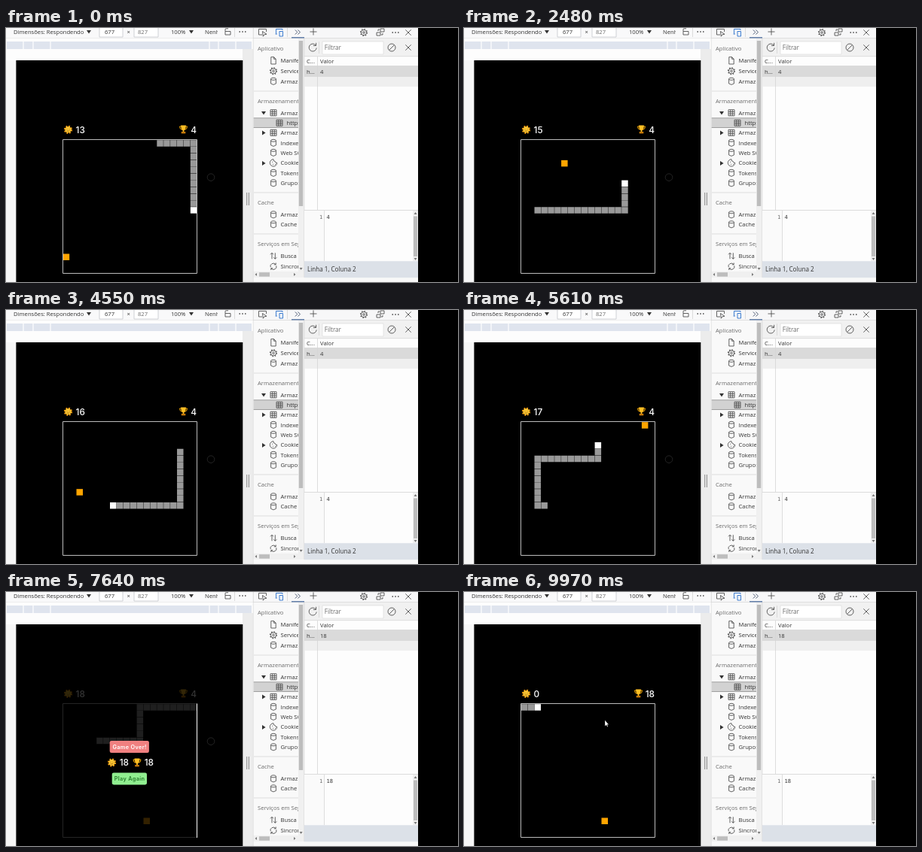
Write an HTML page that moves like this. It is 600x338 px and loops after 10000 ms.

```html
<!DOCTYPE html>
<html lang="pt">
<head>
<meta charset="utf-8">
<title>Snake</title>
<style>
html, body { margin: 0; width: 100%; height: 100%; overflow: hidden; background: #000; }
svg { display: block; width: 100vw; height: 100vh; }
text { font: 7.65px "Open Sans", "Noto Sans", sans-serif; fill: #333; }
.muted { fill: #6b6b6b; }
.wide { font-size: 8.1px; }
.mono { font: 7px "DejaVu Sans Mono", monospace; }
.score text { font: 500 11.8px Inter, sans-serif; fill: #fff; }
.score .button { font: 600 7.3px Inter, sans-serif; letter-spacing: .35px; text-anchor: middle; }
.score .again { fill: #267a2b; }
.line { fill: none; stroke: #484848; stroke-width: .85; }
.rule { fill: none; stroke: #d5d5d5; stroke-width: .8; }
</style>
</head>
<body>
<svg viewBox="0 0 600 338">
  <defs>
    <g id="sun">
      <circle r="4.6" fill="none" stroke="#f8a010" stroke-width="2" stroke-dasharray="2 1.61"/>
      <circle r="4" fill="#ffc936"/>
      <path d="M-1.5-1.2v1M1.5-1.2v1M-1.8 1.3q1.8 1.6 3.6 0" fill="none" stroke="#734400" stroke-width=".7"/>
    </g>
    <g id="trophy">
      <path d="M-3-4H-5q0 4 3.4 4.4M3-4H5q0 4-3.4 4.4" fill="none" stroke="#f5a800" stroke-width="1"/>
      <path d="M-3.4-5.4H3.4Q3.4 0 .9 1.2V3H-.9V1.2Q-3.4 0-3.4-5.4Z" fill="#ffbf24"/>
      <path d="M-2.8 3H2.8V5.4H-2.8Z" fill="#c87a08"/>
    </g>
    <g id="cylinder" class="line"><ellipse cy="-3" rx="3.4" ry="1.5"/><path d="M-3.4-3V3.2Q0 6 3.4 3.2V-3"/></g>
    <path id="grid" class="line" d="M-4-4H4V4H-4ZM-4-1.3H4M-4 1.3H4M-1.3-4V4M1.3-4V4"/>
    <g id="gear" class="line"><circle r="4.4" stroke-width="1.3" stroke-dasharray="1.4 2.056"/><circle r="3.6"/><circle r="1.3"/></g>
    <path id="document" class="line" d="M-3.2-4.7H.6L3.2-2V4.7H-3.2ZM.6-4.7V-2H3.2"/>
    <g id="cookie" class="line"><path d="M0-4.6A4.7 4.7 0 1 0 4.7 0Q2.5.5 2.2-1.8Q-.3-1.7 0-4.6"/><path d="M-2-1h1M-1 2h1M2 2h1"/></g>
    <path id="transfer" class="line" d="M-2 4V-4M-4-2L-2-4L0-2M2.3-4V4M.3 2L2.3 4L4.3 2"/>
    <path id="sync" class="line" d="M-3.8 1A3.9 3.9 0 0 1 3-2.6M3.8-1A3.9 3.9 0 0 1-3 2.6M3.2-4.8V-2.4H.8M-3.2 4.8V2.4H-.8"/>
    <path id="close" class="line" d="M-3.7-3.7L3.7 3.7M3.7-3.7L-3.7 3.7"/>
    <path id="down" d="M-3-2H3L0 2.6Z" fill="#333"/>
    <path id="right" d="M-2-3V3L2.6 0Z" fill="#333"/>
    <path id="dots" d="M-4.5 0h1.5M-.75 0H.75M3 0H4.5" stroke="#444" stroke-width="1.5"/>
    <clipPath id="sideClip"><path d="M328 13H388V324H328Z"/></clipPath>
    <clipPath id="throttleClip"><path d="M260 0H281V14H260Z"/></clipPath>
    <clipPath id="boardClip"><path d="M75 148H254V328H75Z"/></clipPath>
  </defs>

  <!-- device toolbar -->
  <path d="M0 0H547V338H0Z" fill="#fdfdfd"/>
  <path d="M0 0H328V13H0Z" fill="#f9f9fa"/>
  <path d="M0 13.5H328" class="rule" stroke-opacity=".5"/>
  <text x="10" y="8">Dimensões: Respondendo</text><use href="#down" x="110" y="5"/>
  <path d="M124-2H155V12H124ZM170-2H202V12H170Z" fill="#fff" stroke="#c4c7cc" stroke-width=".8"/>
  <text x="131" y="8">677</text><text x="160.5" y="8">×</text><text x="175" y="8" class="muted">827</text>
  <text x="219" y="8">100%</text><use href="#down" x="246" y="5"/>
  <g clip-path="url(#throttleClip)"><text x="264" y="8">Nenhuma</text></g>
  <path class="line" d="M291 4.5H298V9H291ZM291 4.5V2Q291 .8 292.2.8H295"/>
  <path class="rule" d="M303.5 0V12"/><use href="#dots" x="314" y="5"/>
  <path d="M1 18H326V28H1Z" fill="#dfe4ee"/>
  <path d="M23 18V28M36 18V28M59 18V28M270 18V28M282 18V28M305 18V28" stroke="#fff" stroke-width="1.2"/>
  <path d="M314 28H328V338H314Z" fill="#ececec"/><path d="M0 43H13.5V338H0Z" fill="#f7f7f7"/>
  <path d="M13.4 42.9H314.3V338H13.4Z"/>
  <path d="M319.7 219V236M322.4 219V236" stroke="#888" stroke-width="1"/>

  <!-- inspector toolbar -->
  <path d="M328 0H547V13.5H328Z" fill="#f7f7f8"/>
  <path class="rule" d="M328.3 0V338M328 13.6H547M373.5 0V12"/>
  <path class="line" d="M340 9H335.5V1.5H345.5V5M340.5 4.5L346 8.3L343 8.7L341.3 11.2Z"/>
  <path class="line" style="stroke:#1a66c9" d="M360 8H357.5M358.5 7.5V1.5H367V3M363 4.5H367.5V11H363Z"/>
  <path class="line" style="stroke:#33435f" d="M383.8 2.5L386.8 5.5L383.8 8.5M387.5 2.5L390.5 5.5L387.5 8.5"/>
  <path d="M379 12.8H396" stroke="#41659a" stroke-width="1.2"/>
  <path class="line" d="M403.5 5H412.5M408 .5V9.5"/>
  <use href="#gear" x="475" y="6"/>
  <path class="line" d="M497 1H502V5H497ZM492 6H497V10H492ZM494 4V2H496M500 7V9H498"/>
  <use href="#dots" x="517" y="6"/><use href="#close" x="534" y="6"/>

  <!-- storage sidebar -->
  <path d="M328.7 14H388V324H328.7Z" fill="#f9f9f9"/>
  <path d="M328.7 120H388V132.5H328.7Z" fill="#d2d2d2"/>
  <path d="M328.7 119.8H388M328.7 132.5H388" stroke="#8c8c8c" stroke-width=".8"/>
  <path class="rule" d="M329 84H388M329 219H388M329 274H388"/>
  <g id="sidebar" clip-path="url(#sideClip)"></g>
  <use href="#down" x="342" y="113"/><use href="#right" x="342" y="139.5"/><use href="#right" x="342" y="180"/>
  <path d="M388 14H395.5V332H388ZM328.7 324H388V332H328.7Z" fill="#f0f0f0"/>
  <path d="M388.8 17H394.2V237H388.8ZM336 325.2H350V330.8H336Z" fill="#bdbdbd"/>
  <path d="M389.6 319H393.6L391.6 322ZM333 326V330L330.5 328ZM382 326V330L384.5 328Z" fill="#777"/>
  <path d="M328.7 332H547V338H328.7Z" fill="#f8f8f8"/>

  <!-- storage table -->
  <path d="M396 14H547V37.5H396Z" fill="#f1f1f1"/>
  <path class="rule" d="M395.8 14V332M415.5 18V34"/>
  <path class="line" d="M411.2 23A5 5 0 1 0 412.2 26.5M411.6 19.8V23.4H408"/>
  <path d="M420 18H501V35H420Z" fill="#fff" stroke="#dcdcdc" stroke-width=".7"/><text x="422.8" y="29" class="muted wide">Filtrar</text>
  <g class="line"><circle cx="512" cy="26" r="5"/><path d="M508.5 29.5L515.5 22.5"/></g><use href="#close" x="534" y="26"/>
  <path d="M396 51H547V65H396Z" fill="#dadada"/><path d="M396 65H547V78H396Z" fill="#efefef"/>
  <path class="rule" d="M396 37.7H547M396 50.5H547M413.5 38V242M396 242.5H547"/>
  <text x="399" y="47">C...</text><text x="417" y="47">Valor</text>
  <text x="399" y="61">h...</text><text x="417" y="61" class="stored"></text>

  <!-- value editor -->
  <path d="M396 243H422V310H396Z" fill="#fafafa"/><path class="rule" d="M422.5 243V310"/>
  <text x="416" y="253.5" class="muted mono">1</text>
  <text x="425.5" y="253.5" class="stored mono"></text>
  <path d="M540 243H547V310H540Z" fill="#f0f0f0"/><path d="M541 250.5H546V304H541Z" fill="#bdbdbd"/>
  <path d="M541.5 248H545.5L543.5 245ZM541.5 306H545.5L543.5 309Z" fill="#777"/>
  <path d="M396 310.3H547V332.3H396Z" fill="#dce1e8"/>
  <text id="status" class="wide" x="400" y="324">Linha 1, Coluna 2</text>

  <!-- game -->
  <g id="game" class="score">
    <use href="#sun" x="82.5" y="135.3"/><text id="score" x="92.5" y="139.7"></text>
    <use id="bestIcon" href="#trophy" y="135"/><text id="best" x="253" y="139.7" text-anchor="end"></text>
    <g clip-path="url(#boardClip)">
      <path id="body" fill="#999"/><path id="head" fill="#fff"/><path id="food" fill="#ffa500"/>
    </g>
    <path d="M75.5 148.5H253.5V326.5H75.5Z" fill="none" stroke="#bbb"/>
  </g>
  <g id="dialog" class="score">
    <path d="M253.5 148.5V327" stroke="#fff"/>
    <rect x="137.7" y="198" width="52.2" height="16" rx="2.3" fill="#f08080"/>
    <text x="164" y="208.8" class="button">Game Over!</text>
    <use href="#sun" x="140.5" y="227"/><text x="150.7" y="231.2">18</text>
    <use href="#trophy" x="174" y="227"/><text x="183.7" y="231.2">18</text>
    <rect x="140.7" y="240.4" width="46.3" height="16" rx="2.3" fill="#90ee90"/>
    <text x="164" y="251.2" class="button again">Play Again</text>
  </g>
  <circle id="touch" r="4.8" fill="none" stroke="#242424"/>
  <path id="pointer" d="M187 170.5V178.6L188.9 176.9L190.2 179.4L191.2 178.9L190 176.5H192.2Z" fill="#fff" stroke="#000" stroke-width=".3"/>
</svg>
<script>
const LOOP = 10000, TICK = 47, FIRST_TICK = 12, CELL = 8.9;
const CRASH = 131, SAVED_AT = 6225, RESTART = 9000;
const byId = id => document.getElementById(id);

// Sidebar rows: baseline, label, icon, indent
const rows = [
  [30, 'Aplicativo'], [46, 'Manifesto', 'document'], [60, 'Service workers', 'gear'], [73.5, 'Armazenamento', 'cylinder'],
  [100, 'Armazenamento'], [115.5, 'Armazenamento', 'grid'], [129, 'https', 'grid', 8], [142, 'Armazenamento', 'grid'],
  [155.5, 'IndexedDB', 'cylinder'], [168.5, 'Web SQL', 'cylinder'], [182, 'Cookies', 'cookie'],
  [195.5, 'Tokens', 'cylinder'], [209, 'Grupos', 'cylinder'],
  [235, 'Cache'], [251, 'Armazenamento', 'cylinder'], [264, 'Cache', 'cylinder'],
  [290, 'Serviços em Segundo'], [306, 'Busca em', 'transfer'], [320, 'Sincronização', 'sync']
];
byId('sidebar').innerHTML = rows.map(([y, label, icon, indent = 0]) => icon
  ? `<use href="#${icon}" x="${355 + indent}" y="${y - 2.7}"/><text x="${364.5 + indent}" y="${y}">${label}</text>`
  : `<text class="muted" x="334" y="${y}">${label}</text>`).join('');

// Corners of the snake's route, expanded to one cell per tick
const corners = [[14, 0], [19, 0], [19, 17], [0, 17], [0, 10], [15, 10], [15, 3], [6, 3], [6, 2],
  [17, 2], [17, 12], [2, 12], [2, 5], [11, 5], [11, 0], [20, 0]];
const trail = [corners[0]];
for (const [cx, cy] of corners.slice(1)) {
  let [x, y] = trail.at(-1);
  while (x !== cx || y !== cy) {
    x += Math.sign(cx - x);
    y += Math.sign(cy - y);
    trail.push([x, y]);
  }
}
const START_LENGTH = 16;

// Tick at which each piece of food is eaten, and its cell
const foods = [[26, 0, 17], [47, 14, 10], [64, 6, 3], [103, 2, 10], [129, 18, 0], [Infinity, 12, 17]];

function square([x, y]) {
  const gap = .4, size = CELL - gap;
  return `M${75.5 + x * CELL + gap / 2} ${149 + y * CELL + gap / 2}h${size}v${size}h${-size}z`;
}

function show(id, visible) {
  byId(id).style.display = visible ? '' : 'none';
}

function touchPosition(t) {
  const ease = (from, to) => {
    const p = Math.min(1, Math.max(0, (t - from) / (to - from)));
    return p * p * (3 - 2 * p);
  };
  const toDialog = ease(7790, 8300), toButton = ease(8610, 8850);
  return [272 - 112 * toDialog + 5 * toButton, 198.7 + 38 * toDialog + 11 * toButton];
}

function render(t) {
  const restarted = t >= RESTART;
  const tick = Math.min(CRASH, Math.max(0, Math.floor((t - FIRST_TICK) / TICK)));
  const over = tick === CRASH && !restarted;
  const eaten = foods.filter(([at]) => tick >= at).length;
  const end = START_LENGTH + tick;
  const snake = restarted ? [[0, 0], [1, 0], [2, 0]] : trail.slice(end - START_LENGTH - eaten, end);

  byId('body').setAttribute('d', snake.slice(0, -1).map(square).join(''));
  byId('head').setAttribute('d', square(snake.at(-1)));
  byId('food').setAttribute('d', square(foods[eaten].slice(1)));
  byId('score').textContent = restarted ? 0 : 13 + eaten;
  byId('best').textContent = restarted ? 18 : 4;
  byId('bestIcon').setAttribute('x', restarted ? 231.5 : 235.5);
  byId('game').setAttribute('opacity', over ? .2 : 1);
  show('dialog', over);

  const saved = t >= SAVED_AT;
  document.querySelectorAll('.stored').forEach(el => el.textContent = saved ? 18 : 4);
  show('status', !saved);

  const [x, y] = touchPosition(t);
  byId('touch').setAttribute('cx', x);
  byId('touch').setAttribute('cy', y);
  show('touch', t < 9600);
  show('pointer', t >= 9960);
}

const startTime = performance.now();
function frame() {
  render((performance.now() - startTime) % LOOP);
  requestAnimationFrame(frame);
}
frame();
</script>
</body>
</html>
```
